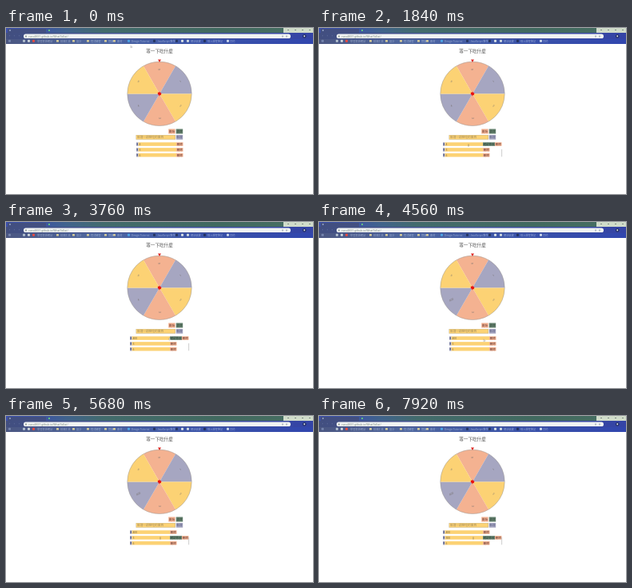
Write an HTML page with a canvas that moves like this. It is 384 by 208 pixels and loops after 8 s.

```html
<!DOCTYPE html>
<html lang="zh-Hant">
<head>
<meta charset="utf-8">
<title>等一下吃什麼</title>
<style>
html, body { margin: 0; width: 100%; height: 100%; overflow: hidden; background: #fff; }
canvas { display: block; width: 384px; height: 208px; }
</style>
</head>
<body>
<canvas id="stage" width="384" height="208"></canvas>
<script>
const ctx = document.getElementById('stage').getContext('2d');
const LOOP = 8000;
const PINK = '#f4b291', YELLOW = '#fcd274', LAVENDER = '#a6a6c1', GREEN = '#64816e';
const CJK = '"Noto Sans CJK TC", "Noto Sans CJK", sans-serif';
const LATIN = 'Roboto, Arial, sans-serif';

const EDIT_FIRST = 1440, SAVE_FIRST = 4240, EDIT_SECOND = 5360;

// time, x, y, pointer kind
const POINTER = [
  [0, 156, 22, 'arrow'], [80, 156, 22, 'arrow'], [440, 194, 190, 'arrow'],
  [960, 210, 148, 'arrow'], [1440, 209, 146, 'arrow'], [1760, 187, 147, 'beam'],
  [2320, 187, 147, 'beam'], [2800, 187, 141, 'arrow'], [3280, 188, 141, 'arrow'],
  [3920, 207, 146, 'arrow'], [4720, 206, 147, 'arrow'], [5280, 208, 152, 'arrow'],
  [5600, 193, 153, 'beam'], [8000, 193, 153, 'beam']
];

function box(x, y, w, h, fill) {
  ctx.fillStyle = fill;
  ctx.fillRect(x, y, w, h);
}

function text(str, x, y, size, fill, align = 'left', font = CJK, weight = 400) {
  ctx.font = `${weight} ${size}px ${font}`;
  ctx.textAlign = align;
  ctx.textBaseline = 'middle';
  ctx.fillStyle = fill;
  ctx.fillText(str, x, y);
}

function polygon(points, fill) {
  ctx.beginPath();
  points.forEach(([x, y]) => ctx.lineTo(x, y));
  ctx.closePath();
  ctx.fillStyle = fill;
  ctx.fill();
}

function pill(x, y, w, h, r, fill) {
  ctx.beginPath();
  ctx.roundRect(x, y, w, h, r);
  ctx.fillStyle = fill;
  ctx.fill();
}

function blend(...stops) {
  const g = ctx.createLinearGradient(0, 0, 384, 0);
  stops.forEach(([p, c]) => g.addColorStop(p, c));
  return g;
}

function button(x, y, w, h, fill, label, ink, size = 3.6) {
  box(x, y, w, h, fill);
  text(label, x + w / 2, y + h / 2 + 0.2, size, ink, 'center', CJK, 500);
}

function drawBrowser() {
  box(0, 0, 384, 6, blend([0, '#3b4fae'], [0.12, '#3d55a0'], [0.2, '#40638c'],
    [0.32, '#426b6c'], [0.7, '#41695f'], [1, '#486f62']));
  box(2, 1, 48, 5, '#424f80');
  box(347, 0, 37, 6, '#d0dcca');
  box(0, 6, 384, 8, blend([0, '#424f80'], [0.5, '#3d4f98'], [1, '#3444a6']));
  box(0, 14, 384, 6, blend([0, '#4b5782'], [0.3, '#5068a0'], [0.6, '#3c55a8'], [1, '#3146ae']));
  box(4, 2, 2, 2, '#8190b4');
  box(53, 2, 2, 2, '#62c07f');
  [352, 361, 370, 379].forEach(x => box(x, 2, 2, 1, '#7d8b80'));

  [4, 10, 16].forEach(x => text('‹', x, 10, 4, '#8290b8', 'left', LATIN));
  pill(22, 7.6, 334, 5.5, 2.7, '#f1f4f3');
  box(24, 9.5, 2, 2, '#98a39f');
  text('vuno4831.github.io/WhatToEat/', 28, 10.7, 3.5, '#849188', 'left', LATIN);
  [345, 350].forEach(x => box(x, 9.5, 2, 2, '#b5bcc3'));
  pill(371, 8, 4.5, 4.5, 2.2, '#1e2b62');
  box(372.4, 9.2, 1.7, 2, '#d6dbe8');
  drawBookmarks();
}

function drawBookmarks() {
  [[3, '#7483ad'], [21, '#b3c0cf'], [27, '#cdd5da'], [33, '#e8493f'],
   [152, '#4ba3e6'], [184, '#25345f'], [212, '#26355f'], [219, '#d9e2e5'],
   [226, '#d0dae0'], [247, '#22305c'], [276, '#ccd8eb']]
    .forEach(([x, c]) => pill(x, 14.8, 3, 3, 0.8, c));
  [63, 83, 101, 123, 134].forEach(x => pill(x, 15, 3, 2.6, 0.4, '#d6cb97'));
  [[39, '學習資源網站'], [68, '前端工具'], [88, '設計'], [106, '程式練習'],
   [128, '閱讀'], [139, '素材'], [157, 'Design Tutorial'], [189, 'JavaScript 教學'],
   [231, '網站收藏'], [252, '線上課程筆記'], [280, '其他']]
    .forEach(([x, s]) => text(s, x, 16.6, 3.2, 'rgba(205,218,240,.6)'));
}

function drawWheel(t) {
  const cx = 192, cy = 82.4, r = 40.2, step = Math.PI / 3;
  const colors = [PINK, LAVENDER, YELLOW];
  const labels = ['6', '1', '2', '3', t < SAVE_FIRST ? '4' : '400', '5'];
  for (let i = 0; i < 6; i++) {
    const mid = -Math.PI / 2 + i * step;
    ctx.beginPath();
    ctx.moveTo(cx, cy);
    ctx.arc(cx, cy, r, mid - step / 2, mid + step / 2);
    ctx.fillStyle = colors[i % 3];
    ctx.fill();
  }
  labels.forEach((label, i) => {
    const mid = -Math.PI / 2 + i * step;
    ctx.save();
    ctx.translate(cx + 30.5 * Math.cos(mid), cy + 30.5 * Math.sin(mid));
    ctx.rotate(i > 3 ? mid + Math.PI : mid);
    text(label, 0, 0, 3.4, '#77716f', 'center', LATIN);
    ctx.restore();
  });
  ctx.beginPath();
  ctx.arc(cx, cy, r, 0, Math.PI * 2);
  ctx.strokeStyle = '#9b9793';
  ctx.lineWidth = 0.5;
  ctx.stroke();
  polygon([[190, 39.4], [194, 39.4], [192, 43]], '#df2520');
  polygon([[190, 80.4], [191.8, 80.7], [192.3, 79.4], [193.2, 81.2], [194.5, 81.5],
           [193.6, 84.2], [192.4, 84], [191.8, 85.6], [190.8, 83.6], [189.8, 83.2]], '#e9120e');
}

function typed(t, first, start, gap) {
  const zeros = Math.max(0, Math.min(2, Math.floor((t - start) / gap) + 1));
  return first + '0'.repeat(zeros);
}

function drawRow(x, y, label, editing) {
  box(x, y, 2.6, 4.5, LAVENDER);
  box(x + 0.6, y + 1, 1.2, 2.4, '#4a5683');
  box(x + 2.6, y, 47.4, 4.5, YELLOW);
  text(label, x + 3.4, y + 2.5, 3.4, '#7f6f4a', 'left', LATIN);
  let end = x + 50;
  if (editing) {
    button(end, y, 15, 4.5, GREEN, '確認修改', '#33493c', 3.4);
    end += 15;
  }
  button(end, y, 8.5, 4.5, PINK, '刪除', '#5e3a33');
}

function drawList(t) {
  const first = t >= EDIT_FIRST && t < SAVE_FIRST;
  const second = t >= EDIT_SECOND;
  const x = first || second ? 155 : 163;
  drawRow(x, 143.3, typed(t, '4', 2400, 240), first);
  drawRow(x, 150.2, typed(t, '5', 6000, 240), second);
  drawRow(x, 157, '6', false);
  if (first || second) box(228.3, 152, 0.8, 9.3, '#c2c2c2');
}

function drawForm() {
  button(203.2, 126.5, 8.5, 6, PINK, '開始', '#6d4038');
  button(212.7, 126.5, 8.5, 6, GREEN, '清空', '#33493c');
  box(162.5, 134, 49.5, 5.8, '#cbbb91');
  box(163, 134.5, 48.5, 4.8, YELLOW);
  text('新增一項想吃的東西', 164, 137, 3.7, '#a08b5c');
  button(212.7, 134, 8.5, 5.8, LAVENDER, '新增', '#585d80');
}

function drawPointer(t) {
  const i = POINTER.findIndex((p, n) => n > 0 && t < p[0]);
  const [t0, x0, y0, kind] = POINTER[i - 1];
  const [t1, x1, y1] = POINTER[i];
  const u = (t - t0) / (t1 - t0), k = u * u * (3 - 2 * u);
  const x = x0 + (x1 - x0) * k, y = y0 + (y1 - y0) * k;
  if (kind === 'beam') {
    box(x - 0.3, y - 1.5, 0.6, 3.2, '#71684f');
    return;
  }
  polygon([[x, y], [x, y + 3], [x + 0.8, y + 2.3], [x + 2.1, y + 2.2]], '#fff');
  ctx.strokeStyle = '#77777a';
  ctx.lineWidth = 0.35;
  ctx.stroke();
}

function draw(now) {
  const t = now % LOOP;
  box(0, 0, 384, 208, '#fff');
  drawBrowser();
  text('等一下吃什麼', 192, 29.2, 5.6, '#4c4c4c', 'center');
  drawWheel(t);
  drawForm();
  drawList(t);
  drawPointer(t);
}

const start = performance.now();
function tick() {
  draw(performance.now() - start);
  requestAnimationFrame(tick);
}
tick();
</script>
</body>
</html>
```
